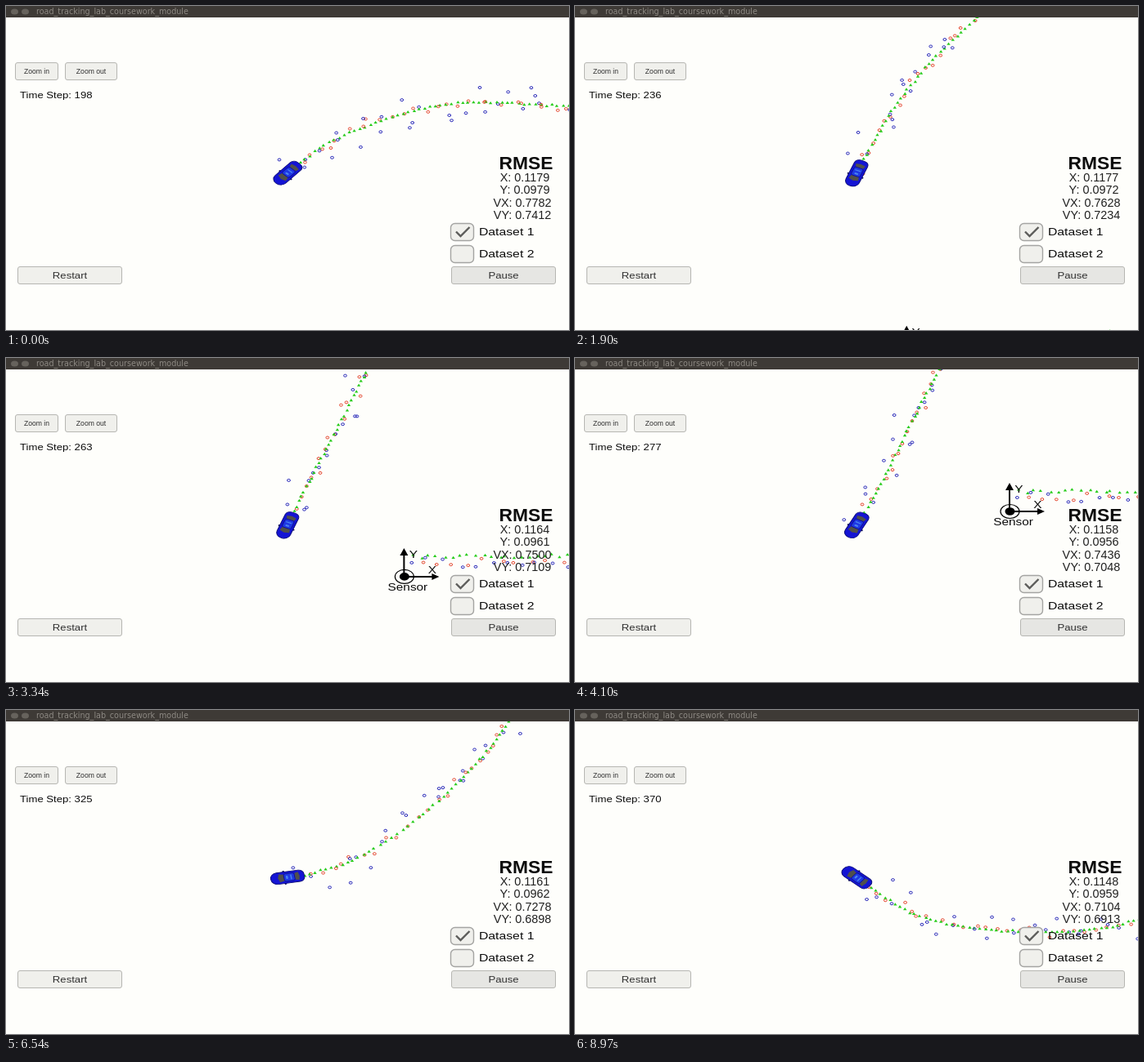
These frames come from a looping animation (688 px wide and 397 px high, 9000 ms). An HTML page with a canvas:

```html
<!DOCTYPE html>
<html lang="en">
<head>
<meta charset="utf-8">
<title>Tracking simulator</title>
<style>
  html, body { margin: 0; width: 100%; height: 100%; overflow: hidden; background: #fefefb; }
  canvas { display: block; }
</style>
</head>
<body>
<canvas id="stage" width="688" height="397"></canvas>
<script>
const ctx = document.getElementById('stage').getContext('2d');
const LOOP = 9000, FIRST = 145, LAST = 370, STRETCH = 1.25, CAR = [344, 205];
const PAPER = '#fefefb', FACE = '#f0f0ec', INK = '#0c0c0c', BLUE = '#2424b8', RED = '#e4442c', GREEN = '#28cc1c';

// time in ms, time step, RMSE of X, Y, VX, VY
const readings = [
  [0, 198, .1179, .0979, .7782, .7412],
  [1100, 220, .1186, .0979, .7703, .7310],
  [2600, 250, .1169, .0966, .7562, .7168],
  [4100, 277, .1158, .0956, .7436, .7048],
  [5070, 296, .1144, .0957, .7354, .6979],
  [6540, 325, .1161, .0962, .7278, .6898],
  [8970, 370, .1148, .0959, .7104, .6913]
];

// time step, x, y of the car, measured from the sensor
const path = [
  [FIRST, 441, -506], [166, 298, -508], [185, 173, -473], [198, 97, -423],
  [220, -7, -314], [250, -104, -139], [277, -187, 17], [296, -272, 114],
  [311, -369, 185], [325, -462, 213], [344, -590, 214], [358, -683, 195],
  [LAST, -754, 150]
];

// seeded value from -1 to 1
const noise = seed => {
  const v = Math.sin(seed * 127.1 + 3.7) * 43758.5453;
  return (v - Math.floor(v)) * 2 - 1;
};

// index of the row whose span holds v
const spanOf = (rows, v) => {
  let i = 0;
  while (i < rows.length - 2 && rows[i + 1][0] <= v) i++;
  return i;
};

function valuesAt(rows, v) {
  const i = spanOf(rows, v), a = rows[i], b = rows[i + 1];
  const u = (v - a[0]) / (b[0] - a[0]);
  return a.map((n, k) => n + (b[k] - n) * u);
}

function slope(i, k) {
  const a = path[Math.max(0, i - 1)], b = path[Math.min(path.length - 1, i + 1)];
  return (b[k] - a[k]) / (b[0] - a[0]);
}

// smooth curve through the path points
function place(step) {
  const s = Math.max(FIRST, Math.min(LAST, step));
  const i = spanOf(path, s), a = path[i], b = path[i + 1];
  const h = b[0] - a[0], u = (s - a[0]) / h, w = 1 - u;
  return [1, 2].map(k =>
    w * w * ((1 + 2 * u) * a[k] + u * h * slope(i, k)) +
    u * u * ((3 - 2 * u) * b[k] - w * h * slope(i + 1, k)));
}

const marks = [];
function mark(color, step, x, y, spread) {
  const seed = marks.length;
  const shift = n => noise(n) * Math.abs(noise(n)) * spread;
  marks.push({ color, step, x: x + shift(seed), y: y + shift(seed + 1000) });
}

for (let s = FIRST; s <= LAST; s++) {
  const [x, y] = place(s);
  mark(s % 2 ? RED : BLUE, s, x, y, s % 2 ? 7 : 22);
  mark(GREEN, s, x, y, 1.5);
}
// the start of the drive, close to the sensor
for (let i = 0; i < 32; i++) {
  const x = 11 + i * 9.5;
  mark(GREEN, 0, x, -25, 4);
  mark(i % 2 ? RED : BLUE, 0, x, -17, 7);
}

function text(str, x, y, size, { wide = 1, align = 'center', color = INK, weight = '', family = 'Liberation Sans, Arial' } = {}) {
  ctx.save();
  ctx.translate(x, y);
  ctx.scale(wide, 1);
  ctx.font = `${weight} ${size}px ${family}, sans-serif`;
  ctx.textAlign = align;
  ctx.fillStyle = color;
  ctx.fillText(str, 0, 0);
  ctx.restore();
}

function box(x, y, w, h, r, fill, stroke, line = 1) {
  ctx.beginPath();
  ctx.roundRect(x, y, w, h, r);
  ctx.fillStyle = fill;
  ctx.fill();
  if (!stroke) return;
  ctx.strokeStyle = stroke;
  ctx.lineWidth = line;
  ctx.stroke();
}

function shape(points, fill) {
  ctx.beginPath();
  points.forEach(p => ctx.lineTo(...p));
  ctx.fillStyle = fill;
  ctx.fill();
}

function line(points, color, width) {
  ctx.beginPath();
  points.forEach(p => ctx.lineTo(...p));
  ctx.strokeStyle = color;
  ctx.lineWidth = width;
  ctx.stroke();
}

function oval(x, y, rx, ry) {
  ctx.beginPath();
  ctx.ellipse(x, y, rx, ry, 0, 0, 7);
}

function drawMark({ color, x, y }) {
  if (color === GREEN) {
    shape([[x - 2.2, y + 1.5], [x, y - 1.8], [x + 2.2, y + 1.5]], color);
    return;
  }
  oval(x, y, 1.9, 1.5);
  ctx.lineWidth = 1;
  ctx.strokeStyle = color;
  ctx.stroke();
}

function drawSensor() {
  ctx.fillStyle = ctx.strokeStyle = '#000';
  ctx.lineWidth = 1.2;
  oval(0.5, 0, 11.5, 8.5);
  ctx.stroke();
  oval(0.5, 0, 6, 4.8);
  ctx.fill();
  line([[0, -28], [0, 0], [36, 0]], '#000', 2);
  shape([[-5, -26], [0, -35], [5, -26]], '#000');
  shape([[34, -4], [43, 0], [34, 4]], '#000');
  text('Y', 11.5, -23, 12.3, { wide: STRETCH });
  text('X', 34.5, -4, 12.3, { wide: STRETCH });
  text('Sensor', 4.5, 17, 12.3, { wide: STRETCH });
}

function drawCar(step) {
  const [ax, ay] = place(step - 3), [bx, by] = place(step + 3);
  ctx.save();
  ctx.translate(...CAR);
  ctx.scale(STRETCH, 1);
  ctx.rotate(Math.atan2(ay - by, (ax - bx) / STRETCH));
  box(-4, -8.5, 2, 17, 1, '#14145a');
  box(-16.5, -7, 33, 14, [6.5, 5, 5, 6.5], '#1414d4', '#0c0c78', .8);
  shape([[-8, -5], [-3.5, -4], [-3.5, 4], [-8, 5], [-9.5, 0]], '#50504c');
  box(-3.5, -4.7, 10.5, 9.4, 2, '#1e38e4', '#0c0c78', .6);
  box(-1.5, -2, 2, 4, 1, '#4a84f0');
  box(3, -3, 1.2, 6, .5, '#4a84f0');
  shape([[7.5, -4], [11, -5], [12, 0], [11, 5], [7.5, 4]], '#50504c');
  ctx.restore();
}

function button(label, x, y, w, size, wide, fill = FACE) {
  box(x + .5, y + .5, w - 1, 21, 2.5, fill, '#b6b6b2');
  text(label, x + w / 2, y + 11 + size * .36, size, { wide, color: '#303030' });
}

function drawPanel(step, rmse) {
  box(0, 0, 688, 14, 0, '#3e3a36');
  ctx.fillStyle = '#66625c';
  for (const x of [10.5, 23.5]) { oval(x, 7, 4.5, 3.6); ctx.fill(); }
  text('road_tracking_lab_coursework_module', 37, 10, 9.6, { align: 'left', color: '#8e8a84', family: 'DejaVu Sans' });

  button('Zoom in', 11, 69, 53, 8.6, 1);
  button('Zoom out', 72, 69, 64, 8.6, 1);
  button('Restart', 14, 319, 128, 10.5, STRETCH);
  button('Pause', 544, 319, 128, 10.5, STRETCH, '#e6e6e3');
  text('Time Step: ' + step, 17, 113, 10.5, { wide: STRETCH, align: 'left' });

  text('RMSE', 635.5, 200, 22.8, { weight: 'bold' });
  ['X', 'Y', 'VX', 'VY'].forEach((name, i) =>
    text(`${name}: ${rmse[i].toFixed(4)}`, i < 2 ? 634 : 631, 215 + i * 15.4, 14.4, { color: '#202020' }));

  [266, 293].forEach((y, i) => {
    box(543.5, y + .5, 28, 21, 5, FACE, '#a4a4a2', 1.4);
    text('Dataset ' + (i + 1), 578, y + 15, 12.6, { wide: STRETCH, align: 'left' });
  });
  line([[550, 276.5], [555.5, 282], [566.5, 271]], '#5c5c5a', 2.4);
}

function draw() {
  const [, count, ...rmse] = valuesAt(readings, performance.now() % LOOP);
  const step = Math.min(LAST, Math.floor(count + .3));
  const [x, y] = place(step);
  ctx.fillStyle = PAPER;
  ctx.fillRect(0, 0, 688, 397);
  ctx.save();
  ctx.translate(CAR[0] - x, CAR[1] - y);
  marks.forEach(m => { if (m.step <= step) drawMark(m); });
  drawSensor();
  ctx.restore();
  drawCar(step);
  drawPanel(step, rmse);
  requestAnimationFrame(draw);
}
draw();
</script>
</body>
</html>
```
